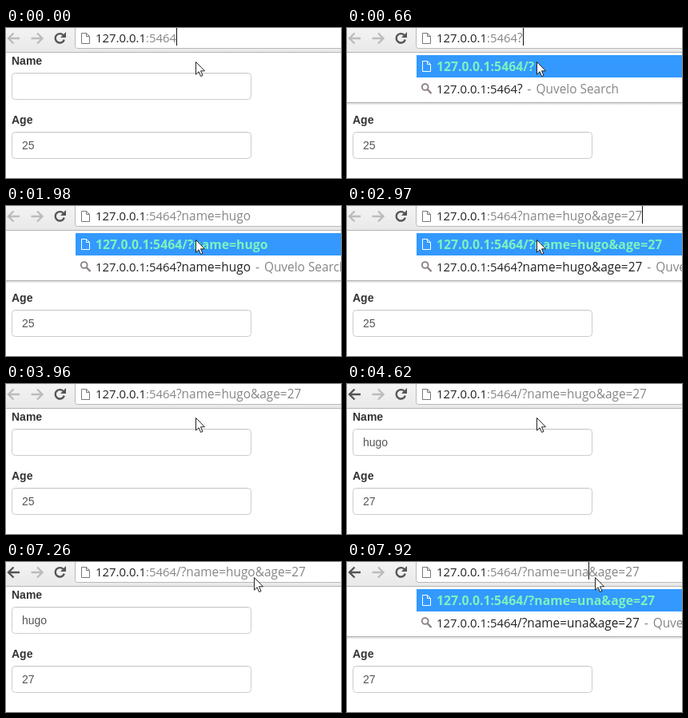
These frames come from a looping animation (419x188 px, 8 s). An HTML page:

```html
<!DOCTYPE html>
<html lang="en">
<head>
<meta charset="utf-8">
<title>Query string form</title>
<style>
  html, body { margin: 0; width: 100%; height: 100%; overflow: hidden; background: #fff; }
  svg { display: block; }
  .url { font: 15.4px "Open Sans", "Noto Sans", sans-serif; fill: #868686; }
  .host { font-size: 14.9px; }
  .dark { fill: #222; }
  .match { font: bold 15.8px "Open Sans", "Noto Sans", sans-serif; fill: #7df2bd; }
  .label { font: bold 14px "Liberation Sans", Arial, sans-serif; fill: #333; }
  .value { font: 14px "Liberation Sans", Arial, sans-serif; fill: #555; }
  .field { fill: #fff; stroke: #ccc; }
  .icon { fill: none; stroke: #555; stroke-width: 2.4; }
</style>
</head>
<body>
<svg width="419" height="188" viewBox="0 0 419 188">
  <defs>
    <linearGradient id="bar" x2="0" y2="1">
      <stop stop-color="#f3f3f3"/><stop offset="1" stop-color="#e9e9e9"/>
    </linearGradient>
    <linearGradient id="shade" x2="0" y2="1">
      <stop stop-color="#000" stop-opacity=".16"/><stop offset="1" stop-color="#000" stop-opacity="0"/>
    </linearGradient>
    <path id="arrow" d="M8.5 -6.5L2 0L8.5 6.5M2.5 0H16"/>
    <path id="sheet" d="M.5 .5H6.5L10.5 4.5V13.5H.5ZM6.5 .5V4.5H10.5"/>
  </defs>

  <!-- page -->
  <text class="label" x="7" y="46">Name</text>
  <rect class="field" x="7.5" y="56.5" width="299" height="33" rx="4"/>
  <path d="M11 57.5H303" stroke="#000" stroke-opacity=".07"/>
  <text class="value" id="name" x="20" y="78"></text>
  <text class="label" x="7" y="120">Age</text>
  <rect class="field" x="7.5" y="130.5" width="299" height="33" rx="4"/>
  <path d="M11 131.5H303" stroke="#000" stroke-opacity=".07"/>
  <text class="value" id="age" x="20" y="152"></text>

  <!-- toolbar -->
  <rect width="419" height="30" fill="url(#bar)"/>
  <path d="M0 30.5H419" stroke="#b4b4b4"/>
  <use id="back" href="#arrow" class="icon" x="1" y="13"/>
  <use href="#arrow" class="icon" transform="translate(47.5 13) scale(-1 1)" style="stroke:#bcbcbc"/>
  <g id="reload">
    <path class="icon" d="M71.6 9A5.7 5.7 0 1 0 72.8 14.6"/>
    <path d="M75 5V12H68Z" fill="#555"/>
  </g>
  <path id="stop" class="icon" d="M62 7.5L73 18.5M73 7.5L62 18.5"/>
  <rect x="86.5" y="-6.5" width="345" height="32" rx="3" fill="#fff" stroke="#b9b9b9"/>
  <use href="#sheet" x="94" y="6" fill="#fff" stroke="#777"/>
  <text class="url" id="addr" x="112" y="18"><tspan class="host dark">127.0.0.1</tspan><tspan class="host">:5464</tspan><tspan id="query"></tspan></text>
  <rect id="caret" y="0" width="1" height="22" fill="#111"/>

  <!-- suggestions -->
  <g id="drop">
    <rect y="31" width="419" height="62" fill="#fff"/>
    <rect y="94" width="419" height="3" fill="url(#shade)"/>
    <path d="M0 93.5H419" stroke="#b2b2b2"/>
    <rect x="87" y="34" width="332" height="28" fill="#3399ff"/>
    <use href="#sheet" x="94" y="41" fill="none" stroke="#fff"/>
    <text class="match" id="best" x="112" y="54"></text>
    <g fill="none" stroke="#8a7f80">
      <circle cx="97.7" cy="74" r="3.9" stroke-width="1.8"/>
      <path d="M100.6 77L105.5 82" stroke-width="2.4"/>
    </g>
    <text class="url" x="112" y="82"><tspan class="host dark">127.0.0.1:5464</tspan><tspan class="dark" id="search"></tspan><tspan dx="6">-</tspan><tspan dx="6">Quvelo Search</tspan></text>
  </g>

  <!-- pointer -->
  <path id="pointer" d="M.5 .5V16.2L4.1 12.8L6.6 18.5L9 17.5L6.5 11.8H11.5Z" fill="#fff" stroke="#222"/>
  <path id="beam" d="M273 .5H276L277 1.5L278 .5H281M277 1.5V15M273 16.5H276L277 15.5L278 16.5H281" fill="none" stroke="#222"/>
</svg>
<script>
  const LOOP = 8000, HOST = "127.0.0.1:5464";
  const el = id => document.getElementById(id);
  const show = (id, on) => el(id).setAttribute("visibility", on ? "visible" : "hidden");

  // typing in the open list: address and suggestion grow together
  const typed = (query, caret) => ({ query, drop: query, caret: caret ? query.length : -1 });

  // each step changes only what it names; caret is an index into the query
  const steps = [
    [0, { query: "", drop: null, caret: 0, at: [237, 42], beam: false,
          back: false, loading: false, name: "", age: "25" }],
    [330, { caret: -1 }],
    [660, typed("?", true)],
    [990, { drop: "?n" }],
    [1320, typed("?name=", false)],
    [1650, typed("?name=hug", true)],
    [1980, typed("?name=hugo", false)],
    [2310, typed("?name=hugo&age", true)],
    [2640, typed("?name=hugo&age=", false)],
    [2970, typed("?name=hugo&age=27", true)],
    [3960, { drop: null, caret: -1 }],
    [4290, { query: "/?name=hugo&age=27", back: true, loading: true }],
    [4620, { loading: false, name: "hugo", age: "27" }],
    [6270, { at: [270, 26] }],
    [6600, { beam: true }],
    [6930, { beam: false, at: [309, 17] }],
    [7260, { at: [310, 19] }],
    [7920, { query: "/?name=una&age=27", drop: "/?name=una&age=27", caret: 10 }]
  ];
  let sum = {};
  const states = steps.map(([, change]) => sum = { ...sum, ...change });

  function draw(s) {
    el("query").textContent = s.query;
    el("name").textContent = s.name;
    el("age").textContent = s.age;
    show("drop", s.drop !== null);
    if (s.drop !== null) {
      el("best").textContent = HOST + "/" + s.drop.replace("/", "");
      el("search").textContent = s.drop;
    }
    show("caret", s.caret >= 0);
    if (s.caret >= 0) {
      const width = el("addr").getSubStringLength(0, HOST.length + s.caret);
      el("caret").setAttribute("x", Math.round(112 + width));
    }
    el("back").style.stroke = s.back ? "#555" : "#bcbcbc";
    show("reload", !s.loading);
    show("stop", s.loading);
    show("pointer", !s.beam);
    show("beam", s.beam);
    el("pointer").setAttribute("transform", `translate(${s.at})`);
  }

  let current = -1;
  const start = performance.now();
  function tick() {
    const t = (performance.now() - start) % LOOP;
    const i = steps.filter(([from]) => from <= t).length - 1;
    if (i !== current) draw(states[current = i]);
    requestAnimationFrame(tick);
  }
  tick();
</script>
</body>
</html>
```
